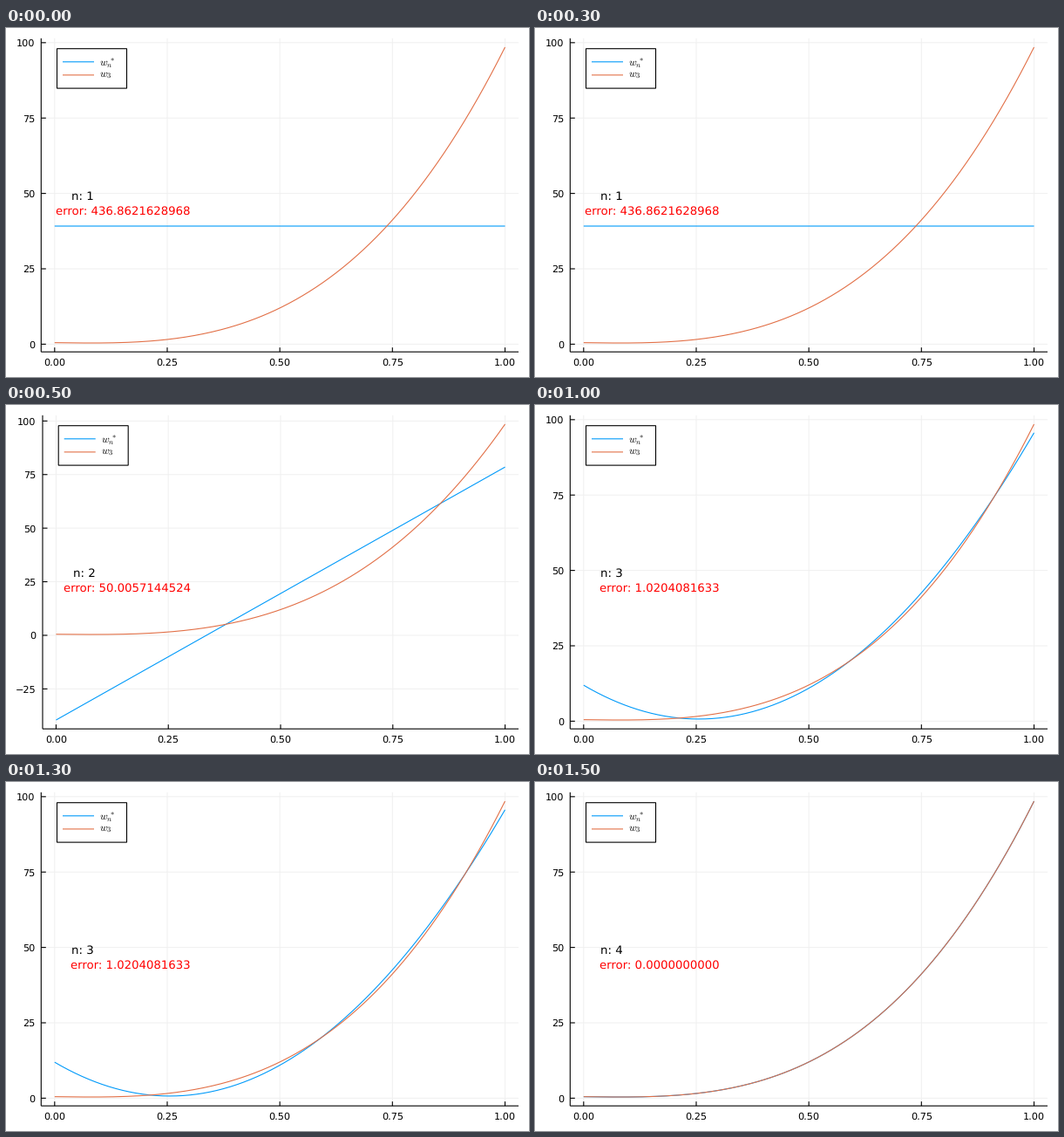
A matplotlib script for the animation above (2 s loop, 600x400 px).

```python
import numpy as np
import matplotlib.pyplot as plt
from matplotlib.animation import FuncAnimation
from matplotlib.patches import Rectangle

W, H, DPI = 600, 400, 100
PT = 72 / DPI  # points per pixel
TOP, BOTTOM, RIGHT = 11.8, 371.2, 588
BLUE, ORANGE, GRID = "#009AFA", "#E26F46", "#F0F0F0"

plt.rcParams.update({
    "font.family": "DejaVu Sans",
    "mathtext.fontset": "cm",
    "text.hinting": "none",
    "path.snap": False,
    "lines.solid_capstyle": "butt",
})

CUBIC = np.array([0.5, -2, 0.01, 100])  # ascending powers
GRAM = np.array([[1 / (i + j + 2) for j in range(4)] for i in range(4)])
XS = np.linspace(0, 1, 201)

fig = plt.figure(figsize=(W / DPI, H / DPI), dpi=DPI, facecolor="white")
ax = fig.add_axes([0, 0, 1, 1])


def best_fit(n):
    """Least squares fit with n coefficients on [0, 1], weight x."""
    fit = np.zeros(4)
    fit[:n] = np.linalg.solve(GRAM[:n, :n], GRAM[:n] @ CUBIC)
    rest = CUBIC - fit
    return fit, abs(rest @ GRAM @ rest)


def evaluate(coefs):
    return np.polyval(coefs[::-1], XS)


def line(xs, ys, color="black", width=1.1, **kw):
    ax.plot(xs, ys, color=color, lw=width * PT, **kw)


def label(x, y, text, size, **kw):
    ax.text(x, y, text, fontsize=size * PT, va="baseline", **kw)


def draw_legend(left):
    x = left + 18.2
    ax.add_patch(Rectangle((x, 23.7), 80, 45.4, fc="white", ec="black",
                           lw=1.1 * PT, zorder=4))
    rows = ((38.8, 43, BLUE, r"$w_n^{\,*}$"), (53.9, 55.5, ORANGE, "$w_3$"))
    for y, base, color, name in rows:
        line([x + 6.5, x + 42.5], [y, y], color, zorder=5)
        label(x + 48.5, base, name, 12, zorder=5)


def draw(frame):
    ax.clear()
    ax.set(xlim=(0, W), ylim=(H, 0))
    ax.axis("off")

    n = frame + 1
    fit, error = best_fit(n)
    curves = [evaluate(fit), evaluate(CUBIC)]
    low, high = np.min(curves), np.max(curves)
    pad = 0.03 * (high - low)
    low, high = low - pad, high + pad
    left = 42 if low < -25 else 40.3  # room for the minus sign

    def px(x):
        return left + (x + 0.03) / 1.06 * (RIGHT - left)

    def py(y):
        return TOP + (high - y) / (high - low) * (BOTTOM - TOP)

    xticks = np.arange(5) / 4
    yticks = [v for v in range(-25, 101, 25) if low < v < high]
    for x in px(xticks):
        line([x, x], [TOP, BOTTOM], GRID, 1, zorder=1)
        line([x, x], [BOTTOM, BOTTOM - 5], zorder=3)
    for v in yticks:
        y = py(v)
        line([left, RIGHT], [y, y], GRID, 1, zorder=1)
        line([left, left + 5.5], [y, y], zorder=3)
        label(left - 7.3, y + 4.2, str(v).replace("-", "\u2212"), 11.3,
              ha="right")
    for v in xticks:
        label(px(v), 387, f"{v:.2f}", 11.3, ha="center")

    line([left, RIGHT], [BOTTOM, BOTTOM], zorder=3)
    line([left, left], [TOP, BOTTOM], zorder=3)

    for ys, color in zip(curves, (BLUE, ORANGE)):
        line(px(XS), py(ys), color, zorder=2)

    edge = px(0.3)
    label(edge - 109.6, 196.8, f"n: {n}", 13.4, ha="right")
    label(edge + 0.5, 214, f"error: {error:.10f}", 13.3, ha="right",
          color="red")
    draw_legend(left)
    return []


anim = FuncAnimation(fig, draw, frames=4, interval=500, repeat=True,
                     repeat_delay=0, init_func=lambda: draw(0))
plt.show()
```
